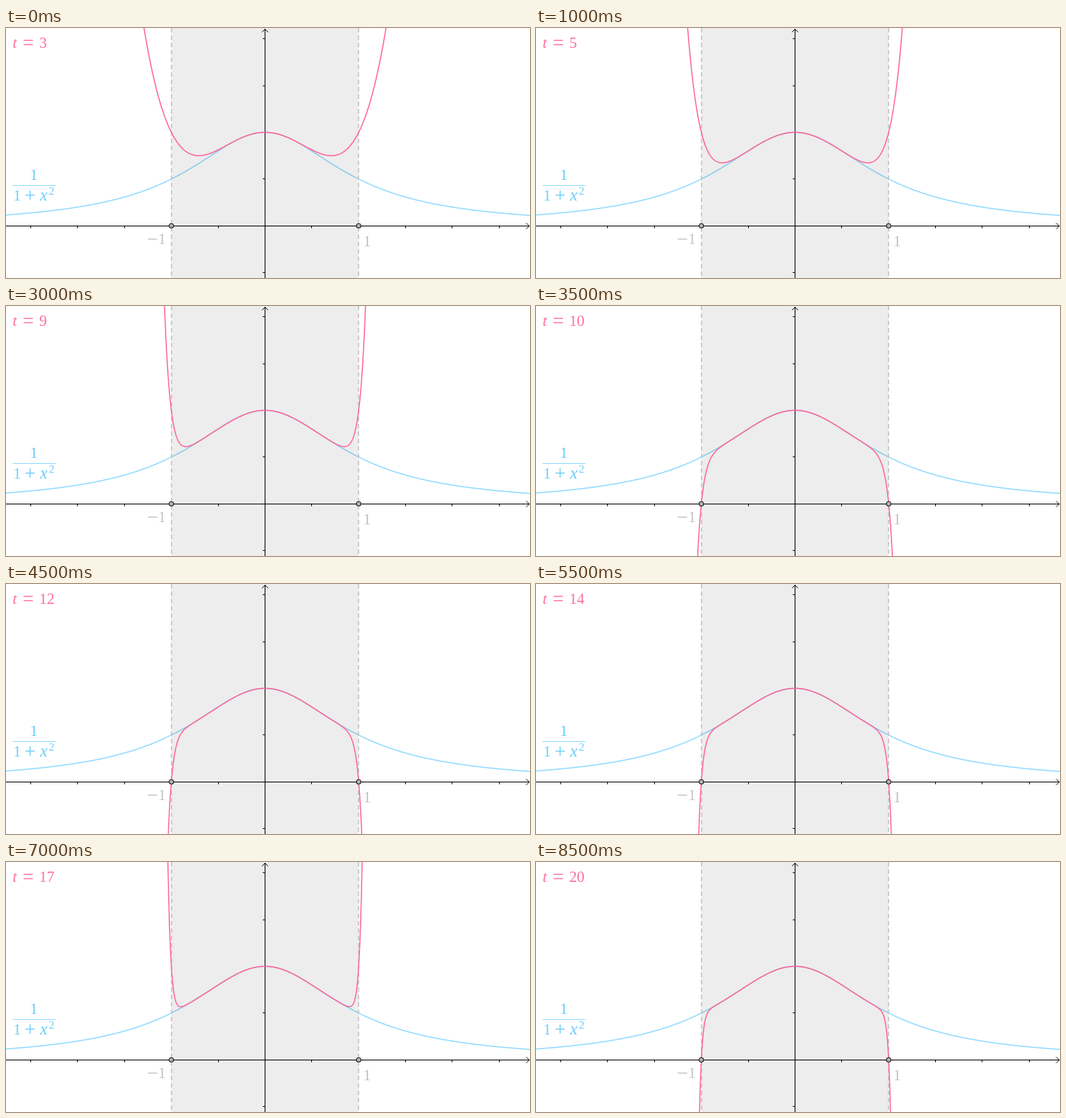
Recreate the animation shown at these times as an HTML page. Size 709 by 339 pixels, loop 9000 ms.

```html
<!DOCTYPE html>
<html lang="en">
<head>
<meta charset="utf-8">
<title>Partial sums of 1/(1+x²)</title>
<style>
  html, body { margin: 0; width: 100%; height: 100%; overflow: hidden; background: #fff; }
  svg { display: block; width: 709px; height: 339px; }
  path, line { fill: none; }
  text { font: 20.7px "Liberation Serif", serif; }
  .it { font-style: italic; }
  .op { font-size: 27px; text-anchor: middle; }
  .sup { font-size: 15px; }
  .pink { fill: #ff6ea0; }
  .blue { fill: #6fcdf8; }
  .gray { fill: #c2c2c2; }
</style>
</head>
<body>
<svg viewBox="0 0 709 339">
  <path id="limit" stroke="#92daff" stroke-width="1.5"/>
  <g stroke="#000">
    <path d="M0 268.5H708M704 264.5L708 268.5L704 272.5"/>
    <path d="M350.5 339V1.5M346.5 5.5L350.5 1.5L354.5 5.5"/>
    <path id="ticks"/>
  </g>
  <rect x="223.7" width="253.5" height="339" fill="#000" fill-opacity=".07"/>
  <path d="M224 0V339M477 0V339" stroke="#c4c4c4" stroke-width="1.6" stroke-dasharray="6 4"/>
  <path id="sum" stroke="#ff6699" stroke-width="1.5" stroke-linejoin="round"/>
  <g fill="#b8b8b8" stroke="#222" stroke-width="1.1">
    <circle cx="223.7" cy="268.2" r="3"/>
    <circle cx="477.2" cy="268.2" r="3"/>
  </g>
  <g class="pink">
    <text class="it" x="9" y="26.5">t</text>
    <text class="op" x="30" y="28.5">=</text>
    <text id="count" x="45" y="26.5"></text>
  </g>
  <g class="blue">
    <text x="32.5" y="206">1</text>
    <path d="M9 213.5H67" stroke="#92daff"/>
    <text x="10" y="233.5">1</text>
    <text class="op" x="32.5" y="235.5">+</text>
    <text class="it" x="46" y="233.5" style="font-size:23px">x</text>
    <text class="sup" x="58" y="225.5">2</text>
  </g>
  <g class="gray">
    <text class="op" x="198" y="295">−</text>
    <text x="206" y="292.5">1</text>
    <text x="483.5" y="296">1</text>
  </g>
</svg>
<script>
  const CX = 350.45, CY = 268.2, UNIT = 126.75;
  const FIRST = 3, LAST = 20, STEP = 500;
  const byId = id => document.getElementById(id);

  function plot(f, reach) {
    const points = [];
    for (let px = -reach; px <= reach; px += 0.5) {
      const y = CY - UNIT * f(px / UNIT);
      points.push(`${(CX + px).toFixed(2)} ${Math.max(-3000, Math.min(3000, y)).toFixed(2)}`);
    }
    return 'M' + points.join('L');
  }

  // Closed form of 1 - x² + x⁴ - ... with the given number of terms.
  const partialSum = terms => x => (1 - (-x * x) ** terms) / (1 + x * x);

  let ticks = '';
  for (let k = -5; k <= 5; k++) {
    const offset = k * UNIT / 2;
    if (k) ticks += `M${Math.floor(CX + offset) + 0.5} 268.5v3`;
    if (k && k >= -1) ticks += `M350.5 ${Math.floor(CY - offset) + 0.5}h-3`;
  }
  byId('ticks').setAttribute('d', ticks);
  byId('limit').setAttribute('d', plot(x => 1 / (1 + x * x), 360));

  let shown;
  function draw(now) {
    const terms = FIRST + Math.floor(now / STEP) % (LAST - FIRST + 1);
    if (terms !== shown) {
      shown = terms;
      byId('count').textContent = terms;
      byId('sum').setAttribute('d', plot(partialSum(terms), 175));
    }
  }

  const start = performance.now();
  function tick() {
    draw(performance.now() - start);
    requestAnimationFrame(tick);
  }
  tick();
</script>
</body>
</html>
```
